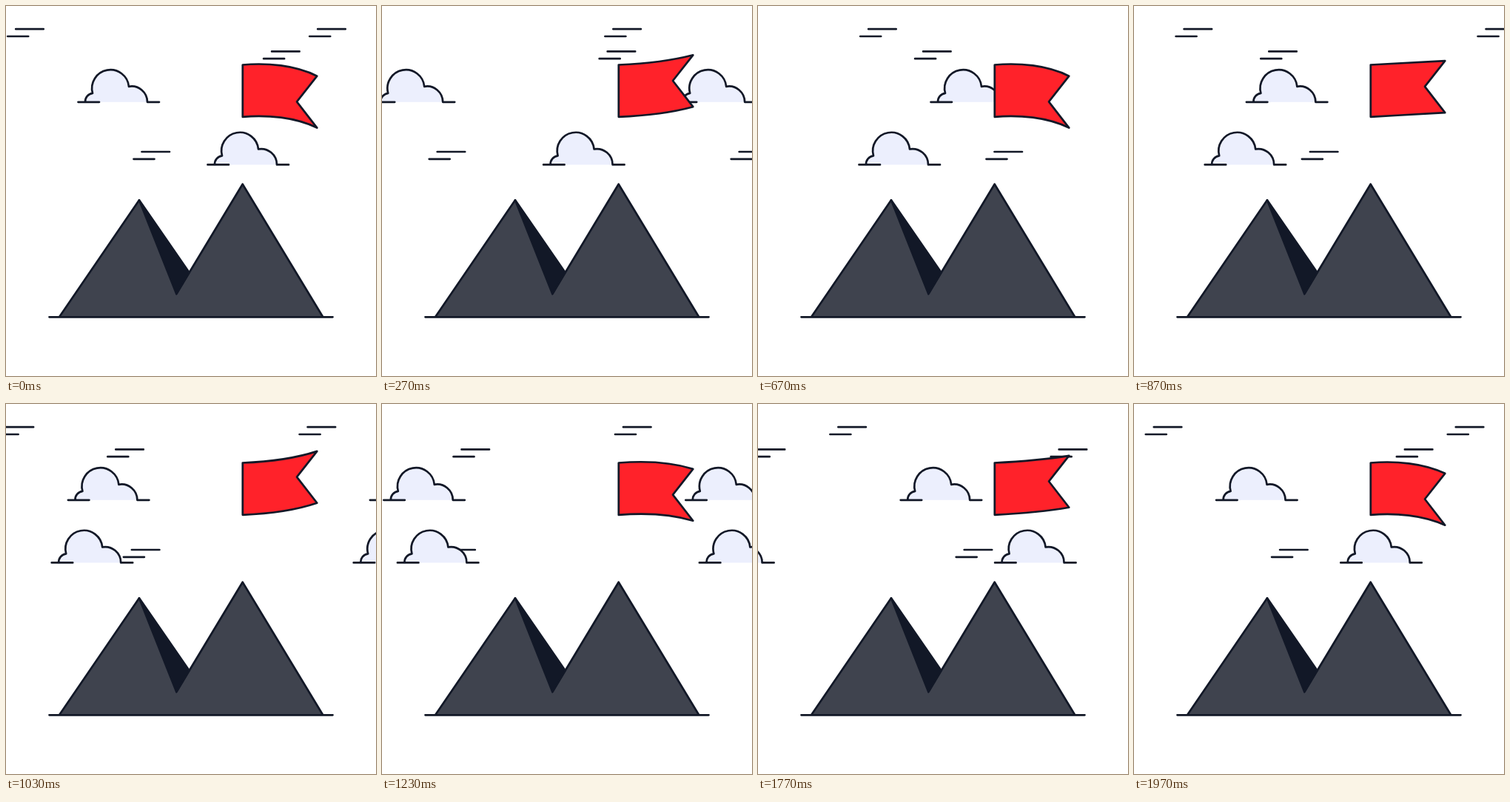
An HTML page that plays this animation: 500 by 500 pixels, repeating every 2.01 s.

```html
<!DOCTYPE html>
<html lang="en">
<head>
<meta charset="utf-8">
<title>Flag over the mountains</title>
<style>
  html, body { margin: 0; width: 100%; height: 100%; overflow: hidden; background: #fff; }
  svg { display: block; width: 100%; height: 100%; }
  .ink { stroke: #121827; stroke-width: 2.7; stroke-linecap: round; stroke-linejoin: round; }
</style>
</head>
<body>
<svg viewBox="0 0 500 500">
  <defs>
    <g id="cloud">
      <path fill="#eceffd" d="M11 0A11.5 11.5 0 0 1 21 -12A25 25 0 1 1 70 -21A21.3 21.3 0 0 1 95 0Z"/>
      <path class="ink" fill="none" d="M1.5 0H30M11 0A11.5 11.5 0 0 1 21 -12A25 25 0 1 1 70 -21A21.3 21.3 0 0 1 95 0H111"/>
    </g>
    <path id="wind" class="ink" d="M12.5 0H50M1.5 9.8H29.5"/>
  </defs>
  <g id="sky"></g>
  <path id="flag" class="ink" fill="#ff222a"/>
  <path fill="#3f434e" d="M72 420.3L180 262.3L247.5 360L319.7 240.7L428.3 420.3Z"/>
  <path class="ink" fill="#121827" stroke-width="2" d="M180 262.3L247.5 360L230.3 389Z"/>
  <path class="ink" fill="none" d="M58.5 420.3H441.5M72 420.3L180 262.3M230.3 389L319.7 240.7L428.3 420.3"/>
</svg>
<script>
  const LOOP = 2010, FRAMES = 60, TILE = 408;

  // laps: how many tile widths each item drifts left per loop
  const items = [
    { shape: 'wind', x: 408.7, y: 31.2, laps: 2 },
    { shape: 'wind', x: 346.6, y: 61.4, laps: 1 },
    { shape: 'cloud', x: 96, y: 129.8, laps: 2 },
    { shape: 'wind', x: 171, y: 197, laps: 2 },
    { shape: 'cloud', x: 271, y: 214.4, laps: 1 },
  ];
  const sky = document.getElementById('sky');
  const flag = document.getElementById('flag');

  function addSvg(parent, tag, attrs) {
    const el = document.createElementNS('http://www.w3.org/2000/svg', tag);
    for (const key in attrs) el.setAttribute(key, attrs[key]);
    return parent.appendChild(el);
  }

  for (const item of items) {
    item.group = addSvg(sky, 'g', {});
    for (let k = -1; k <= 2; k++) {
      addSvg(item.group, 'use', { href: '#' + item.shape, x: k * TILE, y: item.y });
    }
  }

  function flagPath(lift) {
    const mix = (low, high) => low + (high - low) * lift;
    const c1 = mix(76.5, 78.3), c2 = mix(80, 73.2), tip = mix(94.7, 63);
    const h = 70.3;
    return `M319.8 79.5C353 ${c1} 391 ${c2} 420.3 ${tip}L393 ${tip + 34.7}L420.3 ${tip + h - 0.4}` +
      `C391 ${c2 + h} 353 ${c1 + h} 319.8 ${79.5 + h}Z`;
  }

  function draw(ms) {
    // 30 steps per second, timed on a 10 ms grid
    const step = Math.min(FRAMES - 1, Math.floor((Math.floor(ms / 10) + 0.5) * 0.3));
    for (const { group, x, laps } of items) {
      const shift = (step / FRAMES * laps % 1) * TILE;
      group.setAttribute('transform', `translate(${x - shift} 0)`);
    }
    const swing = 1 - Math.abs(step % 20 / 10 - 1);
    flag.setAttribute('d', flagPath(swing * swing * (3 - 2 * swing)));
  }

  const start = performance.now();
  function tick() {
    draw((performance.now() - start) % LOOP);
    requestAnimationFrame(tick);
  }
  tick();
</script>
</body>
</html>
```
